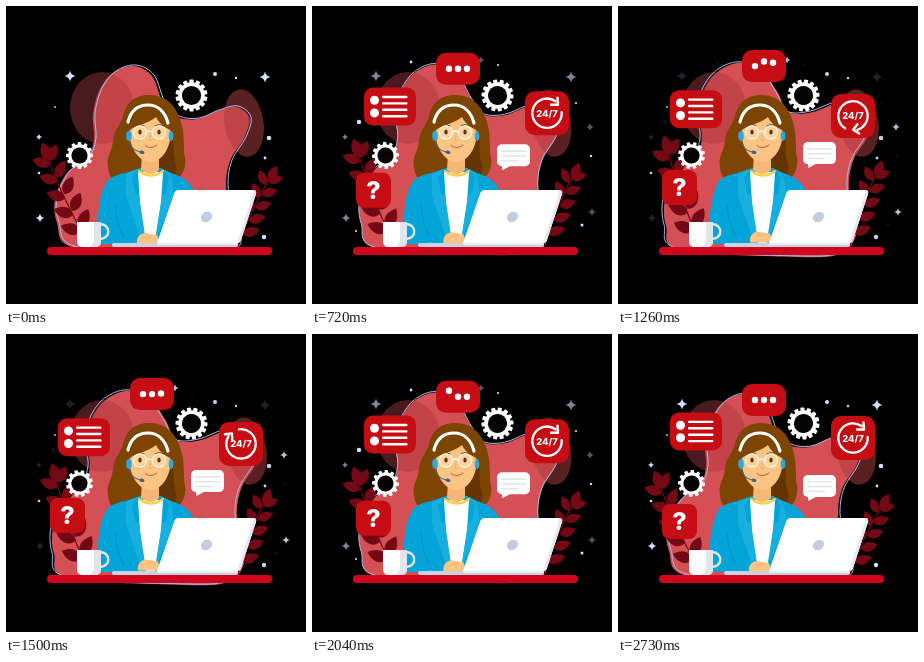
Animation of 300x300 px, one loop 2.76 s. Source, as an HTML page with a canvas:

```html
<!DOCTYPE html>
<html lang="en">
<head>
<meta charset="utf-8">
<title>Online support</title>
<style>
html, body { margin: 0; width: 100%; height: 100%; overflow: hidden; background: #000; }
canvas { display: block; width: 100vw; height: 100vh; object-fit: contain; }
</style>
</head>
<body>
<canvas id="stage"></canvas>
<script>
const LOOP = 2760, STEP = 30, TAU = Math.PI * 2;
const RED = '#c50d13', PLANT = '#740916', SKIN = '#fcc482', HAIR = '#7d4402', BLUE = '#03a4d8';
const canvas = document.getElementById('stage');
const g = canvas.getContext('2d');
const ratio = Math.max(1, window.devicePixelRatio || 1);
canvas.width = canvas.height = 300 * ratio;

const clamp = v => Math.max(0, Math.min(1, v));
const smooth = v => { v = clamp(v); return v * v * (3 - 2 * v); };
const wave = (t, period) => (1 + Math.cos(TAU * t / period)) / 2;
const mix = (a, b, k) => a + (b - a) * k;

function fill(d, color) {
  g.fillStyle = color;
  g.fill(new Path2D(d));
}
function stroke(d, color, width) {
  g.strokeStyle = color;
  g.lineWidth = width;
  g.lineCap = g.lineJoin = 'round';
  g.stroke(new Path2D(d));
}
function ellipse(x, y, rx, ry, color, turn = 0) {
  g.fillStyle = color;
  g.beginPath();
  g.ellipse(x, y, rx, ry, turn, 0, TAU);
  g.fill();
}
const dot = (x, y, r, color) => ellipse(x, y, r, r, color);
function ring(x, y, r, color, width) {
  g.strokeStyle = color;
  g.lineWidth = width;
  g.beginPath();
  g.arc(x, y, r, 0, TAU);
  g.stroke();
}
function box(x, y, w, h, r, color) {
  g.fillStyle = color;
  g.beginPath();
  g.roundRect(x, y, w, h, r);
  g.fill();
}
function label(text, size, y = 0) {
  g.font = `800 ${size}px Inter, sans-serif`;
  g.textAlign = 'center';
  g.textBaseline = 'middle';
  g.fillStyle = '#fff';
  g.fillText(text, 0, y);
}
function at(x, y, draw, turn = 0, scale = 1) {
  g.save();
  g.translate(x, y);
  g.rotate(turn);
  g.scale(scale, scale);
  draw();
  g.restore();
}

// Blob knots: resting x, y, then x, y at the height of the morph.
const KNOTS = [
  [66, 241, 63, 244], [51, 217, 48, 220], [49, 193, 47, 193], [61, 167, 58, 167],
  [82, 150, 78, 149], [88, 132, 84, 130], [87, 108, 80, 108], [94, 83, 85, 86],
  [108, 66, 98, 67], [128, 60, 119, 57], [146, 70, 142, 62], [157, 97, 159, 85],
  [171, 111, 171, 106], [191, 113, 194, 106], [211, 105, 218, 97], [230, 101, 239, 94],
  [243, 112, 253, 108], [238, 132, 250, 130], [224, 155, 236, 153], [220, 180, 231, 178],
  [225, 208, 235, 207], [233, 230, 238, 230], [222, 245, 222, 248], [150, 246, 180, 251]
];

// Closed smooth curve through the knots.
function blobPath(k) {
  const p = KNOTS.map(([x, y, u, v]) => [mix(x, u, k), mix(y, v, k)]);
  const n = p.length, path = new Path2D();
  path.moveTo(...p[0]);
  for (let i = 0; i < n; i++) {
    const [a, b, c, d] = [p[(i + n - 1) % n], p[i], p[(i + 1) % n], p[(i + 2) % n]];
    path.bezierCurveTo(
      b[0] + (c[0] - a[0]) / 6, b[1] + (c[1] - a[1]) / 6,
      c[0] - (d[0] - b[0]) / 6, c[1] - (d[1] - b[1]) / 6, c[0], c[1]);
  }
  path.closePath();
  return path;
}

function backdrop(lift) {
  const blob = blobPath(lift);
  const discs = (left, right) => {
    ellipse(96, 102, 32, 36, left);
    ellipse(238 + 3 * lift, 117, 19.5, 34, right, -0.15);
  };
  discs('#4a1b1e', '#5a2022');
  g.fillStyle = '#d45054';
  g.fill(blob);
  g.save();
  g.clip(blob);
  discs('rgba(110,15,25,.18)', 'rgba(110,15,25,.2)');
  g.restore();
  g.strokeStyle = '#a3bdf0';
  g.lineWidth = 1;
  at(mix(2, -2, lift), -1, () => g.stroke(blob));
}

const STARS = [
  [64, 70, 5.5, 0], [259, 71, 5.5, 0], [33, 131, 3, 0], [34, 212, 4.5, 0],
  [169, 54, 3.5, 1], [278, 121, 4, 1], [280, 206, 4, 1]
];
const SPECKS = [
  [209, 68, 2, 0], [230, 72, 1.2, 0], [263, 132, 2.3, 0], [258, 231, 2.2, 0],
  [33, 167, 1.3, 0], [49, 101, 0.9, 0], [259, 152, 1.4, 0],
  [99, 56, 1.4, 1], [47, 116, 2.2, 1], [44, 225, 1.1, 1], [279, 150, 1.2, 1],
  [270, 219, 1.5, 1], [186, 59, 1.1, 1], [264, 97, 1.1, 1]
];
function sky(t) {
  const a = wave(t, 920), b = wave(t, 1380);
  for (const [x, y, r, late] of STARS) {
    g.globalAlpha = late ? 1 - a : a;
    const k = r * 0.18;
    at(x, y, () => fill(`M0 ${-r}Q${k} ${-k} ${r} 0Q${k} ${k} 0 ${r}Q${-k} ${k} ${-r} 0Q${-k} ${-k} 0 ${-r}Z`, '#cfe2ff'));
  }
  for (const [x, y, r, late] of SPECKS) {
    g.globalAlpha = late ? 1 - b : b;
    dot(x, y, r, '#cfe2ff');
  }
  g.globalAlpha = 1;
}

// Stem grows upward from the origin, leaves in pairs, one at the tip.
function plant(height, pairs, size) {
  stroke(`M0 0Q-5 ${-height / 2} 0 ${-height + 6}`, PLANT, 1.2);
  const leaf = (x, y, turn, s) => at(x, y, () =>
    fill('M0 0C-7 -4 -7 -12 0 -19C7 -12 7 -4 0 0Z', PLANT), turn, s);
  for (let i = 0; i < pairs; i++) {
    const u = (i + 0.6) / pairs;
    const y = -(height - 15) * u, s = size * (1.05 - 0.15 * u);
    leaf(-2, y, -0.85, s);
    leaf(-1, y - 4, 0.85, s);
  }
  leaf(0, -height + 18 * size, 0, size);
}

function gear(x, y, r, teeth, turn) {
  at(x, y, () => {
    for (let i = 0; i < teeth; i++) {
      g.rotate(TAU / teeth);
      box(-r * 0.13, -r, r * 0.26, r * 0.3, 0.8, '#fff');
    }
    dot(0, 0, r * 0.83, '#fff');
    dot(0, 0, r * 0.6, '#050303');
  }, turn);
}

function woman(lift) {
  fill('M143 89C127 89 119 99 117 111C114 120 108 123 107 135C106 146 100 150 102 161C103 172 109 178 119 178' +
    'L162 177C174 175 181 164 179 152C177 143 179 133 176 120C172 101 161 89 143 89Z', HAIR);
  fill('M164 120C170 134 165 146 170 158C172 167 167 174 160 176L150 160Z', '#643503');
  fill('M119 167L134 162H155L165 167C178 171 185 177 188 186L172 238H91' +
    'C91 216 92 186 102 174C107 170 113 168 119 167Z', BLUE);
  fill('M132 166H157L155 197L149 238H140L134 197Z', '#fff');
  fill('M136 147H153V164Q145 172 135 164Z', '#f5b775');
  stroke('M133 165Q145 174 157 165', '#f9cf45', 2.2);
  fill('M132 163L126 171L129 187L133 190L140 237H136L120 190L120 168Z', '#16afe0');
  fill('M157 163L163 170L160 187L156 190L149 234L158 214L168 188L165 168Z', '#16afe0');
  stroke('M109 199Q111 220 118 231', '#0590c0', 0.8);

  fill('M123 119C123 104 132 99 145 99C158 99 165 108 165 122C166 139 157 156 145 156C132 156 122 140 123 119Z', SKIN);
  fill('M121 130C117 109 126 97 143 96C162 96 170 112 167 132L164 124C158 121 153 117 150 111C142 118 130 119 124 124Z', HAIR);
  stroke('M122 116C125 104 132 99 142 99C152 99 159 106 162 117', '#fff', 3.2);

  stroke('M129 120Q133 117.5 138 120M149 120Q153 117.5 158 120', '#7d4402', 1.1);
  for (const x of [134, 153]) {
    dot(x, 126.5, 6.6, '#fdd3a0');
    ellipse(x, 126, 1.7, 2.5, '#633406');
    ring(x, 126.5, 6.6, '#fff4dd', 1.5);
  }
  stroke('M141 126Q143.5 124 146 126', '#fff4dd', 1.5);
  stroke('M144 130L143 134.5H146', '#eba66a', 0.8);
  stroke('M139 139.5Q145 144 151 139', '#b9603c', 1);
  ellipse(123, 130, 2.8, 5, '#29a9dd');
  ellipse(165, 130, 2.4, 4.8, '#29a9dd');
  stroke('M123 135Q125 144 134 146', '#55647a', 1.1);
  ellipse(136, 146.3, 2.5, 1.7, '#355f9f', 0.2);

  at(lift, -1.5 * lift, () => {
    fill('M131 238C130 232 133 228 139 227L151 229L154 238Z', SKIN);
    stroke('M138 232L145 230', '#eaa971', 0.8);
  });
}

function desk() {
  fill('M173 184H247Q251 184 250 188L235 234Q234 237 231 237H151L168 188Q169 184 173 184Z', '#fff');
  fill('M247 184Q251 184 250 188L235 234Q234 237 231 237L247 188Z', '#e4e9f1');
  ellipse(200.5, 211, 6, 4.8, '#c3cde0', -0.6);
  box(106, 237, 126, 4, 2, '#c7d3e1');
  box(151, 237, 81, 2, 1, '#e9eef5');
  box(41, 241, 225, 8, 4, '#d1051d');
  ring(95, 225.5, 7.3, '#e1e7ed', 2.4);
  fill('M71 216H95V235Q95 241 89 241H77Q71 241 71 235Z', '#fff');
  fill('M88 216H95V235Q95 241 89 241H83Q88 239 88 233Z', '#dfe5eb');
}

// Pops out of the anchor (ax, ay), given relative to the card's centre.
function card(t, start, x, y, ax, ay, draw) {
  const s = smooth((t - start) / 420);
  if (s > 0) at(x + ax * (1 - s), y + ay * (1 - s), draw, 0, s);
}

function refresh(turn) {
  g.save();
  g.rotate(turn);
  g.strokeStyle = '#fff';
  g.lineWidth = 2.3;
  g.lineCap = 'round';
  g.beginPath();
  g.arc(0, 0, 14.7, -0.08, TAU - 0.95);
  g.stroke();
  stroke('M10.5 -15.5L11 -8.5L4 -8.5', '#fff', 2.4);
  g.restore();
}

function cards(t) {
  const c = Math.cos(TAU * t / LOOP);

  card(t, 0, 201.5, 151.5 + 2.5 * c, -14, 13, () => {
    box(-16.5, -13, 33, 22, 5, '#fff');
    fill('M-12 7L-11 13L-2 8Z', '#fff');
    for (const [y, w] of [[-7, 26], [-2.2, 26], [2.6, 19]]) box(-13, y, w, 1.6, 0.8, '#e4e6ea');
  });

  card(t, 87, 235, 107 - 3 * c, -22, 20, () => {
    box(-22, -22, 44, 44, 10, RED);
    refresh(TAU * smooth((t - 900) / 900));
    label('24/7', 9.3, 0.8);
  });

  card(t, 150, 78, 100.4 - 2.9 * c, 24, 15, () => {
    box(-26, -19, 52, 38, 9, RED);
    for (const y of [-6.3, 6.3]) dot(-15.5, y, 4.5, '#fff');
    for (let i = 0; i < 4; i++) box(-8, -10.8 + 6.4 * i, 25.5, 2.4, 1.2, '#fff');
  });

  card(t, 160, 146, 63 + 3 * c, 0, 14, () => {
    box(-22, -16, 44, 32, 10, RED);
    for (let i = 0; i < 3; i++) {
      const local = (t - 870) % 1020 - 165 * i;
      const p = t < 870 ? 0 : clamp(local / 310);
      dot((i - 1) * 9, -6 * Math.sin(Math.PI * p), 3.2, '#fff');
    }
  });

  card(t, 195, 61.5, 184.5 + 3 * c, 17.5, -17.5, () => {
    box(-17.5, -17.5, 35, 35, 8, RED);
    label('?', 25, 0.7);
  });
}

function render(t) {
  const lift = 1 - wave(t, LOOP);
  g.setTransform(ratio, 0, 0, ratio, 0, 0);
  g.fillStyle = '#000';
  g.fillRect(0, 0, 300, 300);
  backdrop(lift);
  sky(t);
  at(81, 235, () => plant(107, 5, 1.05), -0.43 + 0.11 * lift, 1 + 0.03 * lift);
  at(232, 240, () => plant(88, 5, 0.9), 0.45 - 0.09 * lift, 1 + 0.03 * lift);
  gear(185.5, 89.5, 16, 14, TAU * t / LOOP);
  gear(73.5, 149.5, 13.5, 12, -TAU * t / LOOP);
  woman(lift);
  desk();
  cards(t);
  g.fillStyle = '#fff';
  g.fillRect(0, 298, 300, 2);
}

const began = performance.now();
function frame() {
  const t = (performance.now() - began) % LOOP;
  render(Math.floor(t / STEP) * STEP);
  requestAnimationFrame(frame);
}
frame();
</script>
</body>
</html>
```
